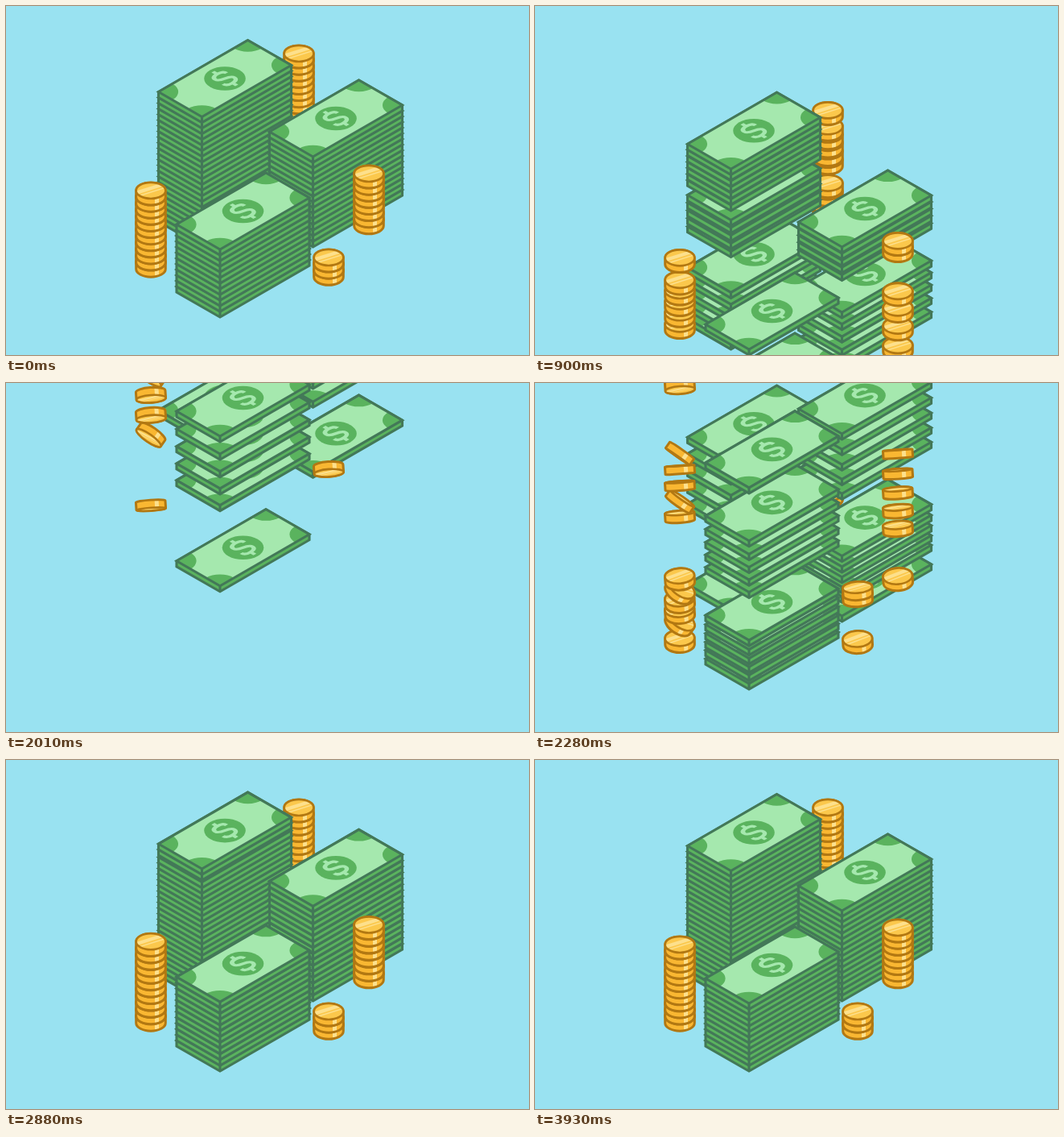
These frames come from a looping animation (650x433 px, 3.96 s). An HTML page with a canvas:

```html
<!DOCTYPE html>
<html lang="en">
<head>
<meta charset="utf-8">
<title>Piles of money</title>
<style>
  html, body { margin: 0; width: 100%; height: 100%; overflow: hidden; background: #99e2f1; }
  canvas { display: block; }
</style>
</head>
<body>
<canvas id="stage" width="650" height="433"></canvas>
<script>
const ctx = document.getElementById('stage').getContext('2d');
const LOOP = 3960, STEP = 30, EMPTY = 1500;
const DROP = 690, LAND = 2280;          // reference times for leaving and landing
const DARK = '#437858', GREEN = '#5ab35e', MINT = '#a5e8ae';
const RIM = '#b27812', SIDE = '#f9b732', FACE = '#fbc84c', SHINE = '#fde08c';
const REST = 0.578, RADIUS = 18.3, THICK = 9.7;

const clamp = v => Math.max(0, Math.min(1, v));

// x, y: place of the top item; n: items, counted from the bottom up.
// lead, early, fade: the top item leaves "lead" ms before DROP, the bottom one "early" ms sooner still.
// start, span, ease: the bottom item lands "start" ms after LAND, the top one "span" ms later.
const defaults = { lift: 0, early: 0, fade: 1, span: 0, ease: 1, phase: 4, pull: 0.0435, spin: -4 };
const piles = [
  { draw: coin, x: 364, y: 59, n: 12, lead: -17, early: 77, start: 76, span: 520, ease: 0.55 },
  { draw: bill, x: 243.5, y: 137.5, n: 23, lead: -25, early: 375, fade: 3, start: 76, span: 560, ease: 0.55 },
  { draw: bill, x: 381.5, y: 187, n: 16, lead: 32, early: 328, fade: 2.2, start: 40, span: 420, lift: 6 },
  { draw: coin, x: 451, y: 208, n: 8, lead: 0, early: 212, fade: 1.8, start: 115, span: 285, lift: 4 },
  { draw: bill, x: 266, y: 379, n: 1, lead: 360, start: 75, pull: 0.0327 },
  { draw: bill, x: 266, y: 302, n: 11, lead: 46, early: 284, start: 40, span: 260, lift: 2, phase: 0 },
  { draw: coin, x: 180, y: 229, n: 12, lead: 0, early: 187, fade: 1.3, start: 30, span: 315, lift: 4, spin: 35 },
  { draw: coin, x: 401, y: 312, n: 3, lead: 154, early: 106, start: 75, span: 100 }
].map(p => ({ ...defaults, ...p }));

function poly(points, fill) {
  ctx.beginPath();
  points.forEach(([x, y]) => ctx.lineTo(x, y));
  ctx.closePath();
  ctx.fillStyle = fill;
  ctx.fill();
}

function disc(x, y, r, fill) {
  ctx.beginPath();
  ctx.arc(x, y, r, 0, 7);
  ctx.fillStyle = fill;
  ctx.fill();
}

const dollar = new Path2D('M8-5.5C8-9.5 5-11 0-11S-8-9-8-5.5-4-.8 0 0 8 2 8 5.5 5 11 0 11-8 9.5-8 5.5M0-11V-17M0 11V17');

// A bundle with the front corner of its top face at x, y
function bill(x, y) {
  const face = [[-54, -31], [57, -95], [111, -64], [0, 0]];
  ctx.save();
  ctx.translate(x, y);
  ctx.strokeStyle = DARK;
  ctx.lineWidth = 3.1;
  poly([...face.slice(0, 3), [111, -57], [0, 7], [-54, -24]], GREEN);
  ctx.stroke();
  ctx.beginPath();
  ctx.moveTo(0, 0);
  ctx.lineTo(0, 7);
  ctx.stroke();

  poly(face, MINT);
  ctx.save();
  ctx.clip();
  ctx.transform(0.867, -0.5, 0.87, 0.5, 0, 0);   // isometric: x along the note, y down it
  for (const u of [0, 128]) for (const v of [0, -62]) disc(u, v, 20, GREEN);
  ctx.translate(64, -31);
  disc(0, 0, 21, GREEN);
  ctx.strokeStyle = MINT;
  ctx.lineWidth = 4.4;
  ctx.stroke(dollar);
  ctx.restore();
  poly(face, 'transparent');
  ctx.stroke();
  ctx.restore();
}

// A coin that tips and rolls more the longer it still has to fall
function coin(x, y, wait, roll) {
  const e = REST - 0.84 * clamp((wait - 130) / 210);
  const ry = RADIUS * Math.abs(Math.sin(e)), h = THICK * Math.cos(e) / 2;
  ctx.save();
  ctx.translate(x, y + 4);
  ctx.rotate(roll * clamp(wait / 90) * Math.PI / 180);
  ctx.strokeStyle = RIM;
  ctx.lineWidth = 3;
  ctx.beginPath();
  ctx.ellipse(0, h, RADIUS, ry, 0, 0, Math.PI);
  ctx.ellipse(0, -h, RADIUS, ry, 0, Math.PI, 2 * Math.PI);
  ctx.closePath();
  ctx.fillStyle = SIDE;
  ctx.fill();
  ctx.save();
  ctx.clip();
  ctx.fillStyle = SHINE;
  ctx.fillRect(5, -30, 5, 60);
  ctx.restore();
  ctx.stroke();

  ctx.translate(0, e > 0 ? -h : h);
  ctx.beginPath();
  ctx.ellipse(0, 0, RADIUS, ry, 0, 0, 7);
  ctx.fillStyle = FACE;
  ctx.fill();
  ctx.save();
  ctx.clip();
  ctx.scale(1, ry / RADIUS);
  ctx.rotate(-0.52);
  ctx.fillStyle = SHINE;
  ctx.fillRect(-20, -8, 40, 7);
  ctx.fillRect(-20, 2, 40, 2.5);
  ctx.restore();
  ctx.lineWidth = 2.6;
  ctx.stroke();
  ctx.restore();
}

// Place in the falling order, 0 to 1, with items bunched in fives
function rank(p, i) {
  const bunched = i - 0.6 * ((i + p.phase) % 5 - 2);
  return clamp(bunched / Math.max(1, p.n - 1));
}

function drawPile(p, t) {
  const settle = (1 - clamp((t - 2880) / 240)) ** 2;
  const spacing = p.draw === coin ? 8.1 : 7;
  for (let i = 0; i < p.n; i++) {
    const r = rank(p, i);
    let wait = 0, shift;
    if (t > EMPTY) {
      wait = Math.max(0, LAND + p.start + p.span * r ** p.ease - t);
      shift = -((p.pull * wait) ** 2) - p.lift * settle * i / p.n;
    } else {
      const fallen = Math.max(0, t - DROP + p.lead + p.early * (1 - r) ** p.fade);
      shift = (p.pull * fallen) ** 2;
    }
    const y = p.y + (p.n - 1 - i) * spacing + shift;
    if (y > -30 && y < 540) p.draw(p.x, y, wait, i % 3 === 1 ? p.spin : -4);
  }
}

function frame(now) {
  const t = Math.floor(now % LOOP / STEP) * STEP;
  ctx.fillStyle = '#99e2f1';
  ctx.fillRect(0, 0, 650, 433);
  piles.forEach(p => drawPile(p, t));
  requestAnimationFrame(frame);
}
frame(0);
</script>
</body>
</html>
```
